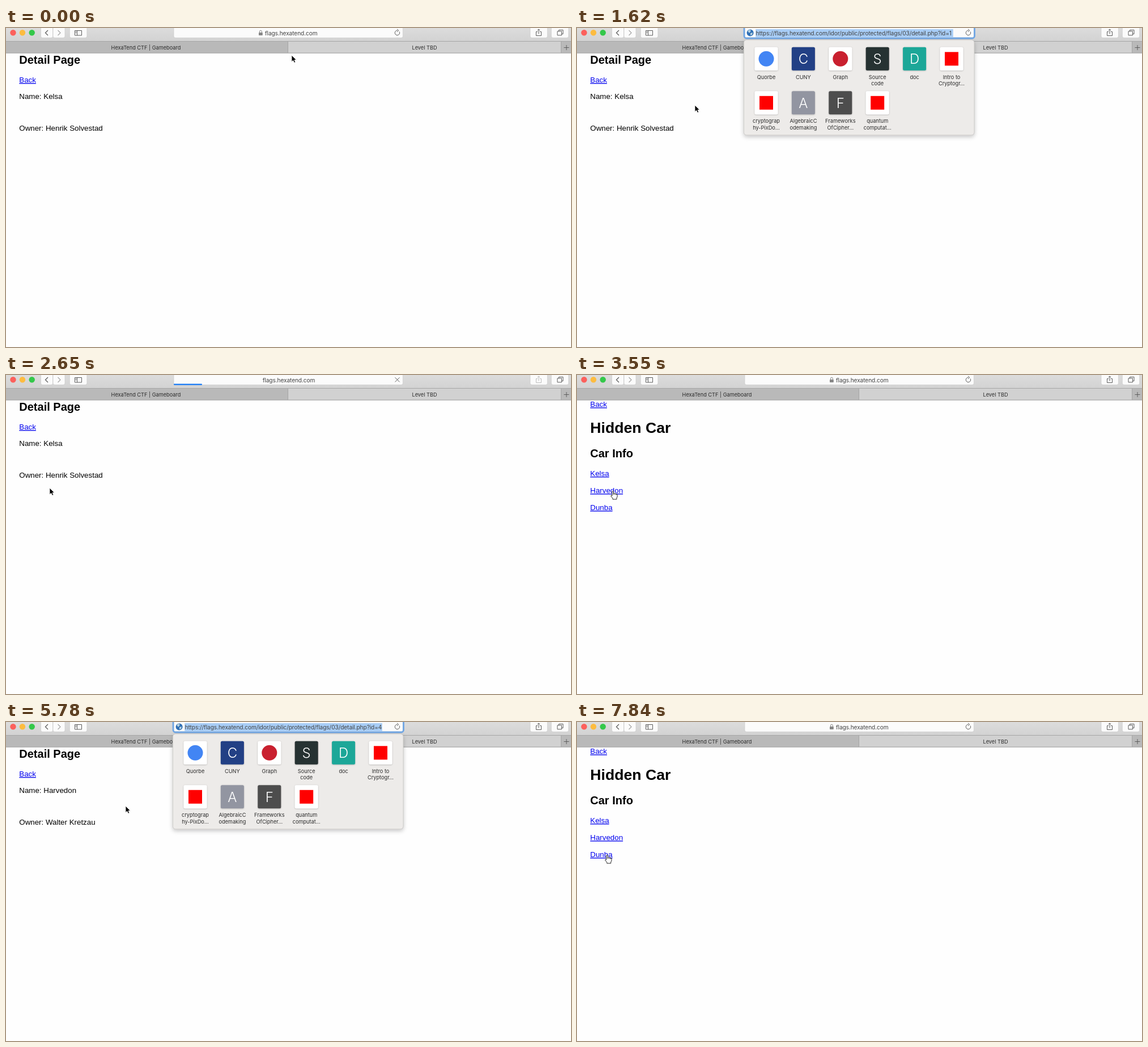
Write an HTML page that moves like this. It is 997 by 562 pixels and loops after 7.99 s.

```html
<!DOCTYPE html>
<html lang="en">
<head>
<meta charset="utf-8">
<title>Detail Page</title>
<style>
  html, body { margin: 0; width: 100%; height: 100%; overflow: hidden; background: #fefefe; }
  svg { display: block; }
  .ui { font: 9.2px Inter, Roboto, sans-serif; fill: #2b2b2b; text-anchor: middle; }
  .bar { font: 10.2px Inter, Roboto, sans-serif; letter-spacing: -.12px; fill: #444; }
  .page { font: 13.33px "Liberation Sans", Arial, sans-serif; fill: #000; }
  .h1 { font-size: 26.67px; font-weight: bold; }
  .h2 { font-size: 20px; font-weight: bold; }
  .link { fill: #00e; text-decoration: underline 1px; text-underline-offset: 1px; }
  .letter { font-size: 24px; font-weight: 300; fill: #fff; }
  .icon { fill: none; stroke: #5c5c5c; stroke-width: 1; }
  .button { fill: #fbfbfb; stroke: #c6c6c6; stroke-width: .6; }
</style>
</head>
<body>
<svg width="997" height="562" viewBox="0 0 997 562">
  <defs>
    <linearGradient id="toolbar" x2="0" y2="1">
      <stop stop-color="#dcdcdc"/><stop offset="1" stop-color="#d2d2d2"/>
    </linearGradient>
    <filter id="shadow" x="-10%" y="-10%" width="120%" height="125%">
      <feDropShadow dx="0" dy="3" stdDeviation="3.5" flood-opacity=".22"/>
    </filter>
    <filter id="tileShadow" x="-20%" y="-20%" width="140%" height="140%">
      <feDropShadow dx="0" dy=".6" stdDeviation=".8" flood-opacity=".28"/>
    </filter>
  </defs>

  <g id="detail" class="page">
    <text x="23.3" y="63" class="h2">Detail Page</text>
    <text x="23.3" y="96" class="link">Back</text>
    <text x="23.3" y="124.8" id="name"></text>
    <text x="23.3" y="181.4" id="owner"></text>
  </g>
  <g id="list" class="page">
    <text x="23.3" y="56.2" class="link">Back</text>
    <text x="23.3" y="101.8" class="h1">Hidden Car</text>
    <text x="23.3" y="144.8" class="h2">Car Info</text>
    <text x="23.3" y="178" class="link">Kelsa</text>
    <text x="23.3" y="208" class="link">Harvedon</text>
    <text x="23.3" y="238" class="link">Dunba</text>
  </g>

  <!-- toolbar and tabs -->
  <rect width="997" height="24" fill="url(#toolbar)"/>
  <rect y="23" width="997" height="21.5" fill="#b9b9b9"/>
  <rect x="498" y="24" width="481" height="20" fill="#d1d1d1"/>
  <path d="M0 23.5H997M0 44H997M497.5 24V44M979.5 24V44" stroke="#a6a6a6" fill="none"/>
  <path d="M984.5 34.5h9M989 30v9" class="icon"/>
  <text x="247" y="37.6" class="ui">HexaTend CTF | Gameboard</text>
  <text x="738.5" y="37.6" class="ui">Level TBD</text>
  <circle cx="12.5" cy="8.3" r="5.2" fill="#fc605c"/>
  <circle cx="29" cy="8.3" r="5.2" fill="#fdbc40"/>
  <circle cx="45.7" cy="8.3" r="5.2" fill="#34c84a"/>
  <g class="button">
    <rect x="61.5" y="-4" width="21" height="21.3" rx="3"/>
    <rect x="83" y="-4" width="21" height="21.3" rx="3"/>
    <rect x="112.3" y="-4" width="30.6" height="21.3" rx="3"/>
    <rect x="296" y="-4" width="404.4" height="21.3" rx="3"/>
    <rect x="925" y="-4" width="30.4" height="21.3" rx="3"/>
    <rect x="962.3" y="-4" width="30.4" height="21.3" rx="3"/>
  </g>
  <g class="icon">
    <path d="M74 4L69.5 8.5L74 13" stroke-width="1.3"/>
    <path d="M91.5 4L96 8.5L91.5 13" stroke="#a5a5a5" stroke-width="1.2"/>
    <path d="M121.5 4.5h12v8.5h-12zM125.5 4.5v8.5M122.7 6.5h1.6M122.7 8.5h1.6"/>
    <path id="share" d="M938 6.5h-2.5v7h9v-7h-2.5M940 10.5V2M937.7 4.2L940 2l2.3 2.2"/>
    <path d="M973 5.8h7.5v7H973zM975.5 5.8V3.5H983v7h-2.5"/>
    <g id="reload"><path d="M694.2 6.6A4.2 4.2 0 1 1 690.4 4.3"/><path d="M690 2l2.8 2.4L690 6.6"/></g>
    <path id="stop" d="M686.5 4.3l8 8m0-8l-8 8"/>
    <g id="plus"><circle cx="305.7" cy="8.5" r="5"/><path d="M303 8.5h5.4M305.7 5.8v5.4"/></g>
  </g>

  <g id="idle">
    <g id="lock">
      <rect x="446" y="8" width="6.8" height="5" rx=".8" fill="#868686"/>
      <path d="M447.5 8V6.2a1.9 1.9 0 0 1 3.8 0V8" fill="none" stroke="#868686"/>
    </g>
    <text id="host" y="12.6" class="bar" text-anchor="middle">flags.hexatend.com</text>
    <rect id="progress" x="296" y="15.5" width="50" height="2.2" rx="1" fill="#1579f6"/>
  </g>

  <g id="open">
    <rect x="295" y="-4" width="406.5" height="22" rx="4" fill="none" stroke="#70a6e4" stroke-width="2.8"/>
    <rect x="315.3" y="2" width="348.5" height="14" fill="#a8cdf6"/>
    <circle cx="305.6" cy="8.4" r="6" fill="#2f6fb5"/>
    <path d="M301 5l4-2 2 2-3 4zM306 9l4-1-1 4-3 1z" fill="#b7d2df"/>
    <text id="url" x="315.5" y="12.6" class="bar"></text>
    <rect x="294.3" y="20.8" width="406.8" height="168" rx="5" fill="#edebe9" stroke="#bdbbb9" stroke-width=".8" filter="url(#shadow)"/>
    <g id="tiles" class="ui"></g>
  </g>

  <g id="cursor" stroke-linejoin="round">
    <path id="arrow" d="M0 0V11.6L2.7 9.1L4.6 13.2L6.7 12.3L4.9 8.3H8.4Z" fill="#000" stroke="#fff" stroke-width=".8"/>
    <path id="hand" d="M-1.2 1Q0-.9 1.2 1V5Q2.7 3.8 3.7 5.2Q5.2 4.3 6 5.8Q7.9 5.2 8 7.4V10L6.7 13V15H-.2V13.3L-3.4 9.2Q-3.5 7.2-1.2 8.8Z M1.2 5V7M3.7 5.5V7M6 6V7.5" fill="#fff" stroke="#111" stroke-width=".9"/>
    <path id="beam" d="M-2.5-6Q0-6 0-4Q0-6 2.5-6M0-4V4M-2.5 6Q0 6 0 4Q0 6 2.5 6M-1.5 1.5h3" fill="none" stroke="#111" stroke-width="1.1"/>
  </g>
</svg>
<script>
const LOOP = 7990, STEP = LOOP / 54;
const $ = id => document.getElementById(id);
const show = (id, on) => { $(id).style.display = on ? "" : "none"; };
const within = (n, ranges) => ranges.some(([from, to]) => n >= from && n <= to);

// fill, letter or plain badge colour, label lines
const tiles = [
  ["#fff", { dot: "#4285f4" }, "Quorbe"],
  ["#233f85", "C", "CUNY"],
  ["#fff", { dot: "#c9202f" }, "Graph"],
  ["#283032", "S", "Source", "code"],
  ["#1ba798", "D", "doc"],
  ["#fff", { square: "#f00" }, "Intro to", "Cryptogr…"],
  ["#fff", { square: "#f00" }, "cryptograp", "hy-PixDo…"],
  ["#9295a1", "A", "AlgebraicC", "odemaking"],
  ["#4d4d4d", "F", "Frameworks", "OfCipher…"],
  ["#fff", { square: "#f00" }, "quantum", "computat…"]
];

function badge(mark, x, y) {
  if (mark.dot) return `<circle cx="${x}" cy="${y + 20.5}" r="13.5" fill="${mark.dot}"/>`;
  if (mark.square) return `<rect x="${x - 12}" y="${y + 8.5}" width="24" height="24" fill="${mark.square}"/>`;
  return `<text x="${x}" y="${y + 29.3}" class="letter">${mark}</text>`;
}

$("tiles").innerHTML = tiles.map(([fill, mark, ...lines], i) => {
  const x = 334 + (i % 6) * 65.4, y = 33.8 + Math.floor(i / 6) * 77.5;
  const label = lines.map((line, k) => `<text x="${x}" y="${y + 56 + k * 11.5}">${line}</text>`).join("");
  return `<rect x="${x - 20.5}" y="${y}" width="41" height="41" rx="2.5" fill="${fill}" filter="url(#tileShadow)"/>`
    + badge(mark, x, y) + label;
}).join("");

// step, x, y of the pointer tip
const path = [
  [0, 504, 48], [1, 540, 30], [2, 590, 12], [3, 612, 7], [8, 612, 7],
  [9, 545, 36], [11, 208, 136], [12, 208, 136], [13, 170, 128], [15, 46, 92], [16, 45, 92],
  [17, 55, 130], [18, 77, 199], [20, 68, 204], [25, 62, 204], [26, 66, 200],
  [27, 120, 170], [30, 590, 20], [31, 625, 6], [36, 625, 6],
  [37, 540, 45], [39, 211, 148], [40, 211, 148], [41, 160, 130], [43, 45, 92], [44, 45, 92],
  [45, 58, 135], [46, 83, 206], [48, 80, 212], [50, 58, 243], [51, 48, 237], [53, 53, 234]
];

function pointer(n) {
  const i = Math.max(1, path.findIndex(p => p[0] >= n));
  const [a, ax, ay] = path[i - 1], [b, bx, by] = path[i];
  const f = (n - a) / (b - a);
  return [ax + (bx - ax) * f, ay + (by - ay) * f];
}

function draw(n) {
  const second = n >= 26;
  const list = within(n, [[19, 25], [47, 53]]);
  const open = within(n, [[4, 11], [33, 39]]);
  const loading = within(n, [[17, 20], [25, 27], [45, 48]]);
  const [x, y] = pointer(n);
  const overBar = y < 18 && x > 296 && x < 700;
  const links = list ? [[56, 173], [82, 203], [62, 233]] : [[53, 92]];
  const overLink = links.some(([right, mid]) => x > 23 && x < right && Math.abs(y - mid) < 8);

  show("detail", !list);
  show("list", list);
  $("name").textContent = "Name: " + (second ? "Harvedon" : "Kelsa");
  $("owner").textContent = "Owner: " + (second ? "Walter Kretzau" : "Henrik Solvestad");
  $("url").textContent = "https://flags.hexatend.com/idor/public/protected/flags/03/detail.php?id=" + (second ? 4 : 1);
  show("open", open);
  show("idle", !open);
  show("lock", !loading);
  show("progress", loading);
  show("stop", loading);
  show("reload", !loading);
  show("plus", overBar && !open);
  $("host").setAttribute("x", loading ? 499 : 503.2);
  $("share").style.stroke = within(n, [[17, 18], [25, 25], [45, 46]]) ? "#bdbdbd" : "";

  show("beam", overBar);
  show("hand", overLink);
  show("arrow", !overBar && !overLink);
  $("cursor").setAttribute("transform", `translate(${x} ${y})`);
}

let start, last;
function frame(now) {
  start ??= now;
  const n = Math.min(53, Math.floor(((now - start) % LOOP + 14) / STEP));
  if (n !== last) draw(last = n);
  requestAnimationFrame(frame);
}
draw(0);
requestAnimationFrame(frame);
</script>
</body>
</html>
```
